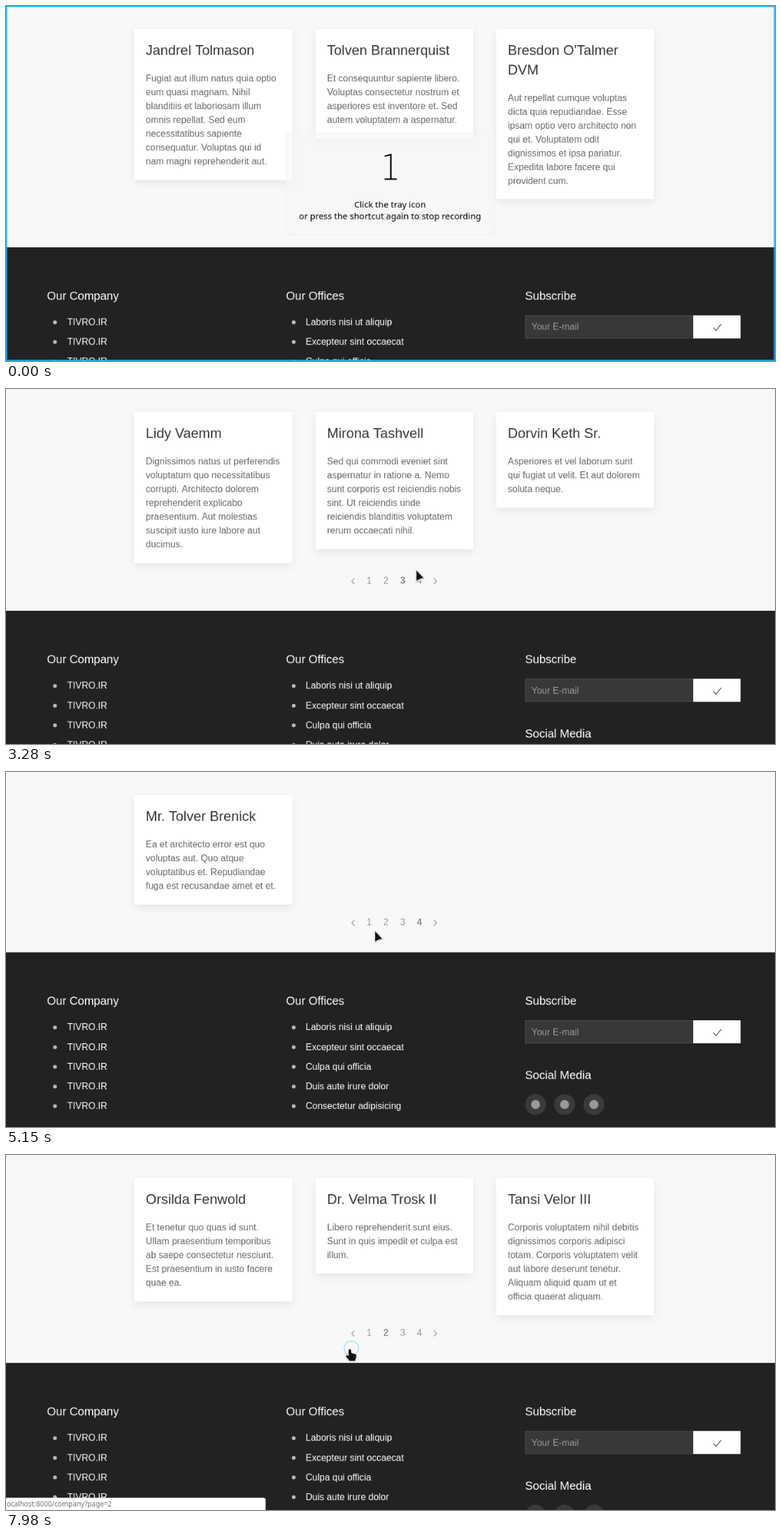
These frames come from a looping animation (1100 by 509 pixels, 8 s). An HTML page with a canvas:

```html
<!DOCTYPE html>
<html lang="en">
<head>
<meta charset="utf-8">
<title>Paged cards</title>
<style>
  html, body { margin: 0; width: 100%; height: 100%; overflow: hidden; background: #f8f8f8; }
  canvas { display: block; }
</style>
</head>
<body>
<canvas id="stage" width="1100" height="509"></canvas>
<script>
const LOOP = 8000;
const SCALE = 0.826;              // CSS px to stage px
const SANS = '"Liberation Sans", Arial, sans-serif';
const NOTO = '"Noto Sans", sans-serif';
const BODY = 16 * SCALE, TITLE = 24 * SCALE, HEAD = 20 * SCALE;
const LINE = 24 * SCALE, TITLE_LINE = 33.6 * SCALE, PAD = 20 * SCALE;
const CARD_TOP = 33, CARD_W = 226, CARD_X = [183.5, 442.5, 701];

// The screen is drawn at full size, in stage units, then shrunk onto the stage.
const stage = document.getElementById('stage').getContext('2d');
stage.imageSmoothingQuality = 'high';
const screenCanvas = document.createElement('canvas');
screenCanvas.width = 1332;
screenCanvas.height = 617;
const ctx = screenCanvas.getContext('2d', { alpha: false });
ctx.scale(1 / SCALE, 1 / SCALE);
const toPixel = v => Math.round(v / SCALE);

// Each card: title lines, then text lines, split by "|"
const pages = [
  [
    ['Jandrel Tolmason', 'Fugiat aut illum natus quia optio|eum quasi magnam. Nihil|blanditiis et laboriosam illum|omnis repellat. Sed eum|necessitatibus sapiente|consequatur. Voluptas qui id|nam magni reprehenderit aut.'],
    ['Tolven Brannerquist', 'Et consequuntur sapiente libero.|Voluptas consectetur nostrum et|asperiores est inventore et. Sed|autem voluptatem a aspernatur.'],
    ["Bresdon O'Talmer|DVM", 'Aut repellat cumque voluptas|dicta quia repudiandae. Esse|ipsam optio vero architecto non|qui et. Voluptatem odit|dignissimos et ipsa pariatur.|Expedita labore facere qui|provident cum.']
  ], [
    ['Orsilda Fenwold', 'Et tenetur quo quas id sunt.|Ullam praesentium temporibus|ab saepe consectetur nesciunt.|Est praesentium in iusto facere|quae ea.'],
    ['Dr. Velma Trosk II', 'Libero reprehenderit sunt eius.|Sunt in quis impedit et culpa est|illum.'],
    ['Tansi Velor III', 'Corporis voluptatem nihil debitis|dignissimos corporis adipisci|totam. Corporis voluptatem velit|aut labore deserunt tenetur.|Aliquam aliquid quam ut et|officia quaerat aliquam.']
  ], [
    ['Lidy Vaemm', 'Dignissimos natus ut perferendis|voluptatum quo necessitatibus|corrupti. Architecto dolorem|reprehenderit explicabo|praesentium. Aut molestias|suscipit iusto iure labore aut|ducimus.'],
    ['Mirona Tashvell', 'Sed qui commodi eveniet sint|aspernatur in ratione a. Nemo|sunt corporis est reiciendis nobis|sint. Ut reiciendis unde|reiciendis blanditiis voluptatem|rerum occaecati nihil.'],
    ['Dorvin Keth Sr.', 'Asperiores et vel laborum sunt|qui fugiat ut velit. Et aut dolorem|soluta neque.']
  ], [
    ['Mr. Tolver Brenick', 'Ea et architecto error est quo|voluptas aut. Quo atque|voluptatibus et. Repudiandae|fuga est recusandae amet et et.']
  ]
].map(page => page.map(card => card.map(part => part.split('|'))));

const offices = ['Laboris nisi ut aliquip', 'Excepteur sint occaecat', 'Culpa qui officia',
  'Duis aute irure dolor', 'Consectetur adipisicing'];

// Timeline
const pageSteps = [[0, 0], [1850, 1], [3190, 2], [4300, 3], [5720, 2], [7920, 1]];
const statusSpans = [[1590, 2150, 2], [2970, 3230, 3], [3960, 4560, 4], [5480, 6050, 3], [7450, 8000, 2]];
const handSpans = [[1400, 1960], [2820, 3200], [3790, 4440], [5300, 5740], [7360, 8000]];
const clicks = [[1620, 544, 298], [2970, 566, 254], [4080, 613.5, 276],
  [5570, 496, 211], [6630, 502, 275], [7710, 494, 277]];
const pointerPath = [
  [1280, 531, 298], [1440, 543, 299], [1900, 543, 299], [2390, 555, 251],
  [2430, 555, 251], [2670, 564, 254], [3060, 565, 254], [3280, 587, 260],
  [3560, 606, 271], [3810, 612, 276], [4400, 612, 276], [4590, 608, 273],
  [4900, 570, 250], [5350, 494.5, 211], [5640, 494.5, 211], [5800, 495, 220],
  [6250, 500, 262], [6420, 500, 273], [7270, 500, 273], [7500, 492, 278]
];

const arrow = new Path2D('M0 0V15.5Q3.5 11.5 10.5 11Z');
const hand = new Path2D('M-2 1.5Q-.2 -1 1.5 1.5L2 6L7.6 7.3Q9.6 8 9 11L7.3 17H-.8L-5.8 10.6Q-5.4 8-2 10Z');

const inSpan = (spans, t) => spans.find(([from, to]) => t >= from && t < to);

// Text sits on whole screen pixels, as a browser sets it.
function text(str, x, middle, size, color, font = SANS, align = 'left') {
  ctx.save();
  ctx.resetTransform();
  ctx.font = `${toPixel(size)}px ${font}`;
  ctx.fillStyle = color;
  ctx.textAlign = align;
  ctx.fillText(str, toPixel(x), toPixel(middle + size * 0.347));
  ctx.restore();
}

function rect(x, y, w, h, color) {
  const left = toPixel(x), top = toPixel(y);
  ctx.save();
  ctx.resetTransform();
  ctx.fillStyle = color;
  ctx.fillRect(left, top, toPixel(x + w) - left, toPixel(y + h) - top);
  ctx.restore();
}

function disc(x, y, r, color) {
  ctx.fillStyle = color;
  ctx.beginPath();
  ctx.arc(x, y, r, 0, Math.PI * 2);
  ctx.fill();
}

function polyline(points, color, width) {
  ctx.strokeStyle = color;
  ctx.lineWidth = width;
  ctx.beginPath();
  points.forEach(([x, y]) => ctx.lineTo(x, y));
  ctx.stroke();
}

const cardHeight = ([title, lines]) => PAD * 3 + title.length * TITLE_LINE + lines.length * LINE;

function drawCard(card, x) {
  const [title, lines] = card;
  ctx.save();
  ctx.shadowColor = 'rgba(0,0,0,.08)';
  ctx.shadowBlur = 15;
  ctx.shadowOffsetY = 5;
  rect(x, CARD_TOP, CARD_W, cardHeight(card), '#fff');
  ctx.restore();
  const left = x + PAD;
  let y = CARD_TOP + PAD;
  title.forEach((line, i) => text(line, left, y + (i + 0.5) * TITLE_LINE, TITLE, '#333'));
  y += title.length * TITLE_LINE + PAD;
  lines.forEach((line, i) => text(line, left, y + (i + 0.5) * LINE, BODY, '#666'));
}

function drawPagination(y, active) {
  for (let i = 0; i < 4; i++) {
    text(i + 1, 519.5 + i * 24, y, BODY, i === active ? '#666' : '#999', SANS, 'center');
  }
  const chevron = (x, dir) =>
    polyline([[x - 2 * dir, y - 3.3], [x + 2 * dir, y + 0.9], [x - 2 * dir, y + 5.1]], '#888', 1);
  chevron(496.5, -1);
  chevron(614, 1);
}

function drawList(items, x, top) {
  items.forEach((item, i) => {
    const y = top + i * 28.2;
    disc(x + 11, y + 0.6, 2.7, '#bbb');
    text(item, x + 28.2, y, BODY, '#fff');
  });
}

function drawFooter(top) {
  rect(0, top, 1101, 510 - top, '#222');
  text('Our Company', 59, top + 69.5, HEAD, '#fff');
  text('Our Offices', 401, top + 69.5, HEAD, '#fff');
  text('Subscribe', 742.7, top + 69.5, HEAD, '#fff');
  drawList(Array(5).fill('TIVRO.IR'), 59, top + 107);
  drawList(offices, 400.5, top + 107);

  const field = top + 97.6;
  rect(742.5, field, 241, 33, '#505050');
  rect(742.5 + SCALE, field + SCALE, 241 - 2 * SCALE, 33 - 2 * SCALE, '#383838');
  text('Your E-mail', 752, field + 16.3, BODY, '#999');
  rect(983.3, field, 67.7, 33, '#fff');
  polyline([[1011.8, field + 17.6], [1015.7, field + 21.6], [1023, field + 12.6]], '#333', 1);

  text('Social Media', 742.7, top + 175.5, HEAD, '#fff');
  for (const x of [757.5, 799, 841]) {
    disc(x, top + 218, 15, '#3a3a3a');
    disc(x, top + 218, 6.5, '#999');
  }
}

function drawPage(index) {
  const page = pages[index];
  const bottom = CARD_TOP + Math.max(...page.map(cardHeight));
  const footer = bottom + 69.15;
  rect(0, 0, 1101, 510, '#f8f8f8');
  page.forEach((card, i) => drawCard(card, CARD_X[i]));
  drawPagination(footer - 43.5, index);
  drawFooter(footer);
}

function drawStatus(page) {
  ctx.fillStyle = '#fff';
  ctx.beginPath();
  ctx.roundRect(-5, 491.5, 376.3, 25, 3);
  ctx.fill();
  text('localhost:8000/company?page=' + page, -1.5, 500.4, 12 * SCALE, '#6b6f75', NOTO);
}

function drawCountdown() {
  ctx.beginPath();
  ctx.roundRect(400.5, 181.5, 299, 147, 7);
  ctx.fillStyle = 'rgba(247,247,247,.6)';
  ctx.fill();
  ctx.strokeStyle = '#efefef';
  ctx.lineWidth = 1;
  ctx.stroke();
  polyline([[541.5, 215.3], [550.5, 213.2], [550.5, 248]], '#000', 2);
  polyline([[541.5, 248.2], [559, 248.2]], '#000', 2);
  text('Click the tray icon', 549.5, 284.6, 15 * SCALE, '#000', NOTO, 'center');
  text('or press the shortcut again to stop recording', 549.5, 301.2, 15 * SCALE, '#000', NOTO, 'center');
  ctx.strokeStyle = '#12b0f8';
  ctx.lineWidth = 1.6;
  ctx.strokeRect(0.6, 0.6, 1098.5, 507.5);
}

function drawRing([start, x, y], t) {
  const p = (t - start) / 300;
  if (p < 0 || p >= 1) return;
  ctx.save();
  ctx.globalAlpha = 0.85 - 0.45 * p;
  ctx.strokeStyle = '#3daee9';
  ctx.lineWidth = 2.6 - 1.6 * p;
  ctx.beginPath();
  ctx.arc(x, y, 10.3 * (1 - (1 - p) ** 2), 0, Math.PI * 2);
  ctx.stroke();
  ctx.restore();
}

function pointerAt(t) {
  const next = pointerPath.findIndex(([time]) => time > t);
  if (next === 0) return pointerPath[0].slice(1);
  if (next < 0) return pointerPath.at(-1).slice(1);
  const [t0, x0, y0] = pointerPath[next - 1], [t1, x1, y1] = pointerPath[next];
  const k = (t - t0) / (t1 - t0);
  return [x0 + (x1 - x0) * k, y0 + (y1 - y0) * k];
}

function drawPointer(t) {
  const shape = inSpan(handSpans, t) ? hand : arrow;
  ctx.save();
  ctx.translate(...pointerAt(t));
  ctx.lineJoin = 'round';
  ctx.strokeStyle = '#fff';
  ctx.lineWidth = 2.2;
  ctx.shadowColor = 'rgba(0,0,0,.3)';
  ctx.shadowBlur = 2;
  ctx.shadowOffsetY = 0.6;
  ctx.stroke(shape);
  ctx.shadowColor = 'transparent';
  ctx.fillStyle = '#111';
  ctx.fill(shape);
  ctx.restore();
}

function drawScreen(t) {
  drawPage(pageSteps.findLast(([time]) => t >= time)[1]);
  if (t < 50) return drawCountdown();
  const status = inSpan(statusSpans, t);
  if (status) drawStatus(status[2]);
  clicks.forEach(click => drawRing(click, t));
  drawPointer(t);
}

function tick() {
  drawScreen(performance.now() % LOOP);
  stage.drawImage(screenCanvas, 0, 0, screenCanvas.width * SCALE, screenCanvas.height * SCALE);
  requestAnimationFrame(tick);
}
tick();
</script>
</body>
</html>
```
